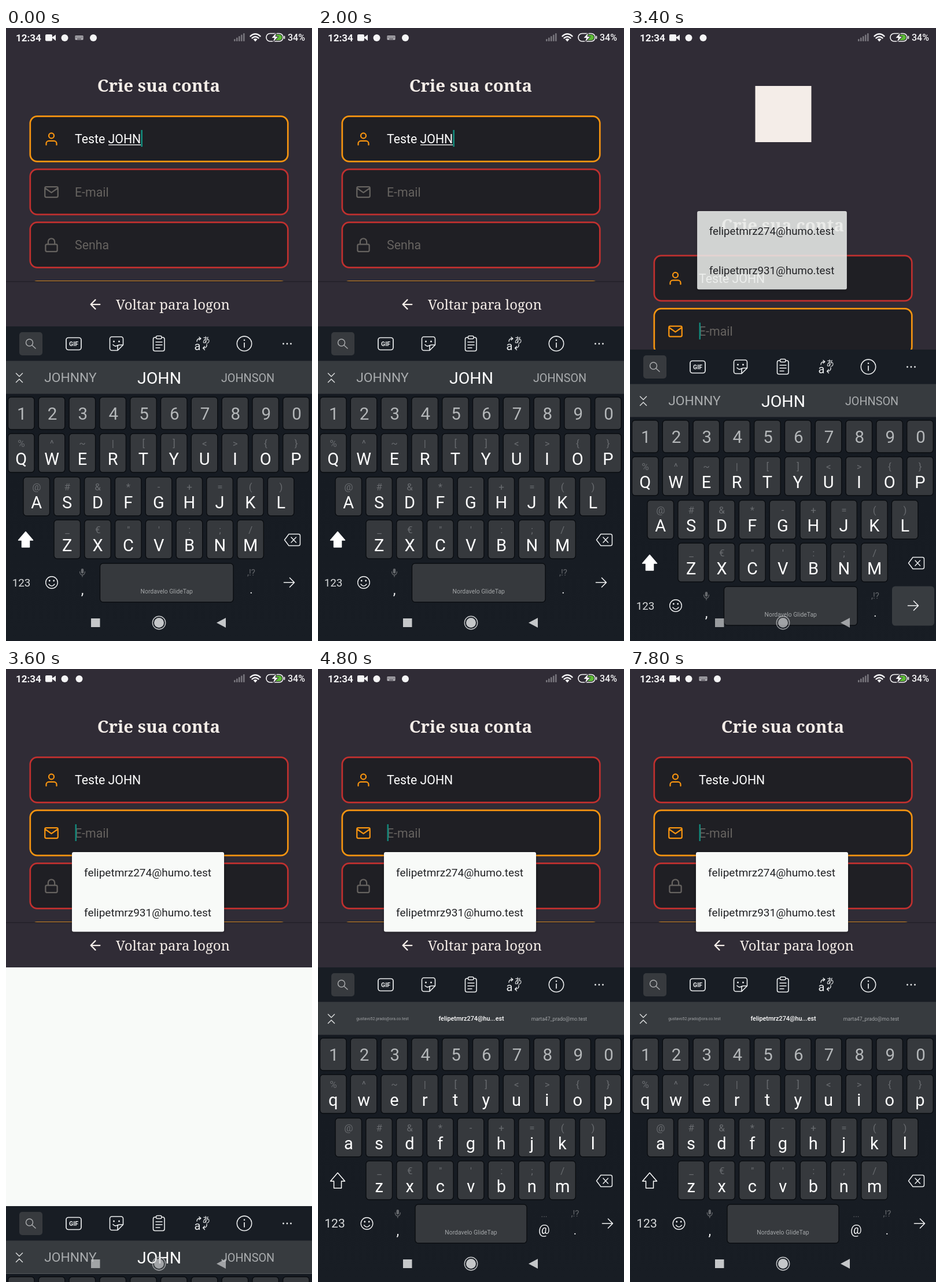
An HTML page with a canvas that plays this animation: 529 by 1058 pixels, repeating every 8 s.

```html
<!DOCTYPE html>
<html lang="pt">
<head>
<meta charset="utf-8">
<title>Crie sua conta</title>
<style>
html, body { margin: 0; width: 100%; height: 100%; overflow: hidden; background: #302c36; }
canvas { display: block; width: 529px; height: 1058px; }
</style>
</head>
<body>
<canvas id="stage"></canvas>
<script>
const W = 529, H = 1058, LOOP = 8000, STEP = 200;
const canvas = document.getElementById('stage');
const dpr = window.devicePixelRatio || 1;
canvas.width = W * dpr;
canvas.height = H * dpr;
const c = canvas.getContext('2d');

const SANS = 'Roboto, "Noto Sans", sans-serif';
const SERIF = '"Noto Serif", serif';
const CJK = '"Noto Sans CJK JP", "Noto Sans CJK", sans-serif';
const BG = '#302c36', FIELD = '#1f1f24', ORANGE = '#f79410', RED = '#c0302f';
const MUTED = '#666360', CREAM = '#f4ede8', TEAL = '#13887a', PAPER = '#f8faf8';
const MAILS = ['felipetmrz274@humo.test', 'felipetmrz931@humo.test'];
const ROWS = [
  { keys: 'QWERTYUIOP', hints: '%^~|[]<>{}', x: 3.5, y: 700 },
  { keys: 'ASDFGHJKL', hints: '@#&*-+=()', x: 30, y: 775 },
  { keys: 'ZXCVBNM', hints: '_€"\':;/', x: 83, y: 849 }
];
const ICONS = {
  user: 'M20 21v-2a4 4 0 0 0-4-4H8a4 4 0 0 0-4 4v2M16 7a4 4 0 1 1-8 0a4 4 0 0 1 8 0',
  mail: 'M4 4h16a2 2 0 0 1 2 2v12a2 2 0 0 1-2 2H4a2 2 0 0 1-2-2V6a2 2 0 0 1 2-2M22 6l-10 7L2 6',
  lock: 'M5 11h14a2 2 0 0 1 2 2v7a2 2 0 0 1-2 2H5a2 2 0 0 1-2-2v-7a2 2 0 0 1 2-2M7 11V7a5 5 0 0 1 10 0v4',
  back: 'M19 12H5M12 19l-7-7 7-7'
};

function text(s, x, y, size, color, align = 'center', weight = 400, font = SANS) {
  c.font = `${weight} ${size}px ${font}`;
  c.textAlign = align;
  c.fillStyle = color;
  c.fillText(s, x, y);
}

function rect(x, y, w, h, color) {
  c.fillStyle = color;
  c.fillRect(x, y, w, h);
}

function box(x, y, w, h, r, fill, stroke, line = 1) {
  c.beginPath();
  c.roundRect(x, y, w, h, r);
  if (fill) { c.fillStyle = fill; c.fill(); }
  if (stroke) { c.strokeStyle = stroke; c.lineWidth = line; c.stroke(); }
}

function disc(x, y, r, color) {
  c.beginPath();
  c.arc(x, y, r, 0, Math.PI * 2);
  c.fillStyle = color;
  c.fill();
}

function ring(x, y, r, color, width) {
  c.beginPath();
  c.arc(x, y, r, 0, Math.PI * 2);
  c.strokeStyle = color;
  c.lineWidth = width;
  c.stroke();
}

function line(d, color, width = 1.6) {
  c.strokeStyle = color;
  c.lineWidth = width;
  c.lineCap = c.lineJoin = 'round';
  c.stroke(new Path2D(d));
}

function shape(d, color) {
  c.fillStyle = color;
  c.fill(new Path2D(d));
}

function icon(name, x, y, color) {
  c.save();
  c.translate(x, y);
  c.scale(1.125, 1.125);
  line(ICONS[name], color, 2);
  c.restore();
}

function statusBar(secondX, badge) {
  const white = '#f5f5f6';
  text('12:34', 17, 22.5, 17, white, 'left', 600);
  box(68, 11, 12, 11.5, 2, white);
  shape('M79 16.5L86 11.5V22Z', white);
  disc(101.5, 17, 6, white);
  disc(secondX, 17, 6, white);
  if (badge) {
    c.globalAlpha = badge;
    box(119.5, 13, 14, 7.5, 1, '#b9b8bd');
    for (let i = 0; i < 5; i++) {
      rect(120.8 + i * 2.5, 14.3, 1.2, 1.2, BG);
      rect(120.8 + i * 2.5, 16.4, 1.2, 1.2, BG);
    }
    rect(123, 18.5, 7, 1, BG);
    c.globalAlpha = 1;
  }
  for (let i = 0; i < 5; i++) {
    const h = 4 + i * 2.5;
    box(394 + i * 4, 23 - h, 2.6, h, 1, '#77757c');
  }
  line('M422.5 14.2Q431 6.5 439.5 14.2M425.5 17.4Q431 12.6 436.5 17.4', white, 2.4);
  shape('M427.5 19.5Q431 16.8 434.5 19.5L431 23.5Z', white);
  box(450, 9.5, 29, 13.5, 6.5, null, white, 1.6);
  box(463, 11.5, 14, 9.5, [0, 4.5, 4.5, 0], '#5dbb35');
  box(480.5, 13.5, 1.8, 5.5, 1, white);
  const bolt = 'M467 8.5L459.5 17H464L462 24L470 15H465.5Z';
  line(bolt, BG, 2);
  shape(bolt, white);
  text('34%', 487, 22, 16, white, 'left', 500);
}

function field(y, border, glyph, tint, label, color) {
  box(41.8, y + 1.35, 445.5, 78, 12.2, FIELD, border, 2.7);
  icon(glyph, 65, y + 27, tint);
  text(label, 119, y + 48, 21.3, color, 'left');
}

function form(dy, onMail, caret) {
  c.save();
  c.translate(0, dy);
  text('Crie sua conta', 264, 110, 29.5, CREAM, 'center', 600, SERIF);
  field(151, onMail ? RED : ORANGE, 'user', ORANGE, 'Teste JOHN', '#fff');
  field(242.5, onMail ? ORANGE : RED, 'mail', onMail ? ORANGE : MUTED, 'E-mail', MUTED);
  field(334, RED, 'lock', MUTED, 'Senha', MUTED);
  if (onMail) {
    rect(119.5, 268, 2.5, 29, TEAL);
  } else {
    rect(177, 201, 56, 1.3, '#fff');
    if (caret) rect(233.3, 176, 2.7, 29, TEAL);
  }
  box(41, 436, 447, 67, 13, '#d58a24');
  c.restore();
}

function footer() {
  rect(0, 437.5, W, 78, BG);
  rect(0, 437, W, 1.3, '#211f27');
  icon('back', 141, 463.5, CREAM);
  text('Voltar para logon', 190, 486, 23.9, CREAM, 'left', 400, SERIF);
}

function popup(alpha, scale) {
  c.save();
  c.translate(245.5, 316);
  c.scale(scale, scale);
  c.globalAlpha = alpha;
  c.shadowColor = 'rgba(0,0,0,.35)';
  c.shadowBlur = 4;
  c.shadowOffsetY = 1;
  box(-131.5, 0, 263, 137.5, 3, PAPER);
  c.shadowColor = 'transparent';
  c.globalAlpha = 1;
  MAILS.forEach((m, i) => text(m, -110.5, 41.5 + i * 69, 19, '#222326', 'left'));
  c.restore();
}

function key(x, y, w, h) {
  box(x, y, w, h, 5.5, '#36393d', '#0a0d11', 1.4);
}

function toolbar() {
  const ink = '#eceeef', back = '#181d24';
  rect(0, 515, W, 60, back);
  box(23, 525, 40, 40, 5, '#373a3e');
  line('M46.5 543A6 6 0 1 1 34.5 543A6 6 0 0 1 46.5 543M45 547.5L51 553', '#a9abad', 1.5);
  box(104, 534.5, 26, 21, 4, null, ink, 1.7);
  text('GIF', 117, 549, 10.5, ink, 'center', 700);
  line('M183 533H199a3.5 3.5 0 0 1 3.5 3.5V547L193 556.5H183a3.5 3.5 0 0 1-3.5-3.5V536.5a3.5 3.5 0 0 1 3.5-3.5M202.5 547H196a3 3 0 0 0-3 3v6.5M185 546.5Q189 551 193 547.5', ink);
  disc(186.5, 541, 1.5, ink);
  disc(195.5, 541, 1.5, ink);
  box(254.5, 534, 19.5, 23.5, 3, null, ink, 1.6);
  box(259.5, 531.5, 9.5, 5, 2, back, ink, 1.5);
  line('M259 542H270M259 547H270M259 552H266', ink, 1.5);
  text('a', 331, 556, 20, ink);
  text('あ', 346, 542.5, 13.5, ink, 'center', 500, CJK);
  line('M330 541Q330 536 336 536M334 533.5L337 536L334 538.5M347 546Q348 552 341 552.5M343.5 549.5L340.5 552.5L343.5 555.5', ink, 1.3);
  ring(412, 544.8, 12.7, ink, 1.6);
  line('M412 543.5V551', ink, 1.7);
  disc(412, 538.8, 1.3, ink);
  for (const x of [479.5, 486, 492.5]) disc(x, 545, 1.4, ink);
}

function suggestions(lower) {
  rect(0, 574.5, W, 57, '#373b3f');
  line('M17.5 596L23 601.5L28.5 596M17.5 611.5L23 606L28.5 611.5', '#d8dadb', 1.5);
  if (lower) {
    text('gustavo52.prado@ora.co.test', 111.5, 606, 6.9, '#a0a3a5');
    text('felipetmrz274@hu...est', 265, 607, 10.8, '#fff', 'center', 500);
    text('marta47_prado@mo.test', 417, 607, 8.7, '#a0a3a5');
  } else {
    text('JOHNNY', 111.5, 611, 22.8, '#a9acae');
    text('JOHN', 265, 613.5, 28.5, '#fff');
    text('JOHNSON', 418, 610.5, 19.8, '#a9acae');
  }
}

function bottomRow(lower, pressed) {
  const ink = '#f2f3f4', dim = '#66696d';
  const m = lower
    ? { num: 29, face: 84.5, comma: 137.8, x: 168, w: 193, dot: 444.5, arrow: 500.5, size: 21 }
    : { num: 26.5, face: 79, comma: 132, x: 162.5, w: 230.5, dot: 424, arrow: 489.5, size: 18.8 };
  text('123', m.num, 964, m.size, '#d9dbdc');
  ring(m.face, 957, 10.3, ink, 1.4);
  disc(m.face - 3.7, 954, 1.4, ink);
  disc(m.face + 3.7, 954, 1.4, ink);
  line(`M${m.face - 5} 960Q${m.face} 966 ${m.face + 5} 960`, ink, 1.4);
  box(m.comma - 2.2, 933, 4.4, 8.5, 2.2, dim);
  line(`M${m.comma - 4.5} 938.5Q${m.comma - 4} 944 ${m.comma} 944Q${m.comma + 4} 944 ${m.comma + 4.5} 938.5M${m.comma} 944V947`, dim, 1.3);
  text(',', m.comma, 978, 24, ink);
  key(m.x, 924, m.w, 67);
  text('Nordavelo GlideTap', m.x + m.w / 2, 976, 10.4, '#a3a6a8');
  if (lower) {
    text('...', 391, 946, 14, dim);
    text('@', 391, 975, 22, ink);
  }
  text(',!?', m.dot, 945, 15, dim);
  text('.', m.dot, 976, 20, ink);
  if (pressed) box(453, 923.5, 73, 68, 5.5, '#383c40');
  const a = m.arrow;
  line(`M${a - 9} 957H${a + 9}M${a + 1} 949L${a + 9} 957L${a + 1} 965`, ink, 1.6);
}

function keyboard(dy, lower, pressed) {
  c.save();
  c.translate(0, dy);
  toolbar();
  suggestions(lower);
  const shade = c.createLinearGradient(0, 632, 0, H);
  shade.addColorStop(0, '#151a21');
  shade.addColorStop(1, '#181d24');
  rect(0, 631.5, W, H - 631.5, shade);
  [...'1234567890'].forEach((d, i) => {
    const x = 3.5 + i * 52.8;
    key(x, 637, 45.5, 56);
    text(d, x + 23.8, 676, 29.5, '#b4b7b9');
  });
  for (const row of ROWS) {
    [...row.keys].forEach((k, i) => {
      const x = row.x + i * 52.8;
      key(x, row.y, 45.5, 67);
      text(row.hints[i], x + 23, row.y + 23, 17, '#686b6f');
      text(lower ? k.toLowerCase() : k, x + 22.8, row.y + 54, 29, '#fff');
    });
  }
  const shift = 'M34 869.5L46.5 884H40.5V896H27.5V884H21.5Z';
  if (!lower) shape(shift, '#fff');
  line(shift, '#fff', 1.5);
  line('M489 873.5H505.5a3 3 0 0 1 3 3V890.5a3 3 0 0 1-3 3H489L481.5 883.5ZM493 879L501.5 888M501.5 879L493 888', '#eceeef', 1.5);
  bottomRow(lower, pressed);
  c.restore();
}

function navBar(alpha) {
  const ink = '#c5c7c9';
  c.globalAlpha = alpha;
  rect(147, 1019, 15.5, 15, ink);
  disc(264.5, 1026.5, 8.5, ink);
  ring(264.5, 1026.5, 11.2, ink, 1.4);
  shape('M364 1026.5L380 1018V1035Z', ink);
  c.globalAlpha = 1;
}

function draw(t) {
  const opened = t >= 3400;
  const tall = opened && t < 3600;
  const sliding = opened && t < 3800;
  const settling = t >= 3800 && t < 4000;
  const slide = tall ? 40 : sliding ? 412 : settling ? 1.5 : 0;

  c.setTransform(dpr, 0, 0, dpr, 0, 0);
  rect(0, 0, W, H, BG);
  if (tall) {
    rect(216.5, 100, 97, 97, CREAM);
    form(240.5, true, false);
    popup(0.82, 0.984);
  } else {
    form(0, opened, t % 1000 < 500);
    footer();
    if (slide) rect(0, 515, W, H - 515, PAPER);
    if (opened) popup(1, 1);
  }
  keyboard(slide, t >= 3800, t >= 3200 && t < 3600);
  navBar(sliding ? 0.75 : 1);
  statusBar(sliding ? 126.5 : settling ? 149 : 151, sliding ? 0 : settling ? 0.6 : 1);
}

const start = performance.now();
function tick(now) {
  const t = Math.max(0, now - start) % LOOP;
  draw(Math.floor(t / STEP) * STEP);
  requestAnimationFrame(tick);
}
draw(0);
requestAnimationFrame(tick);
</script>
</body>
</html>
```
